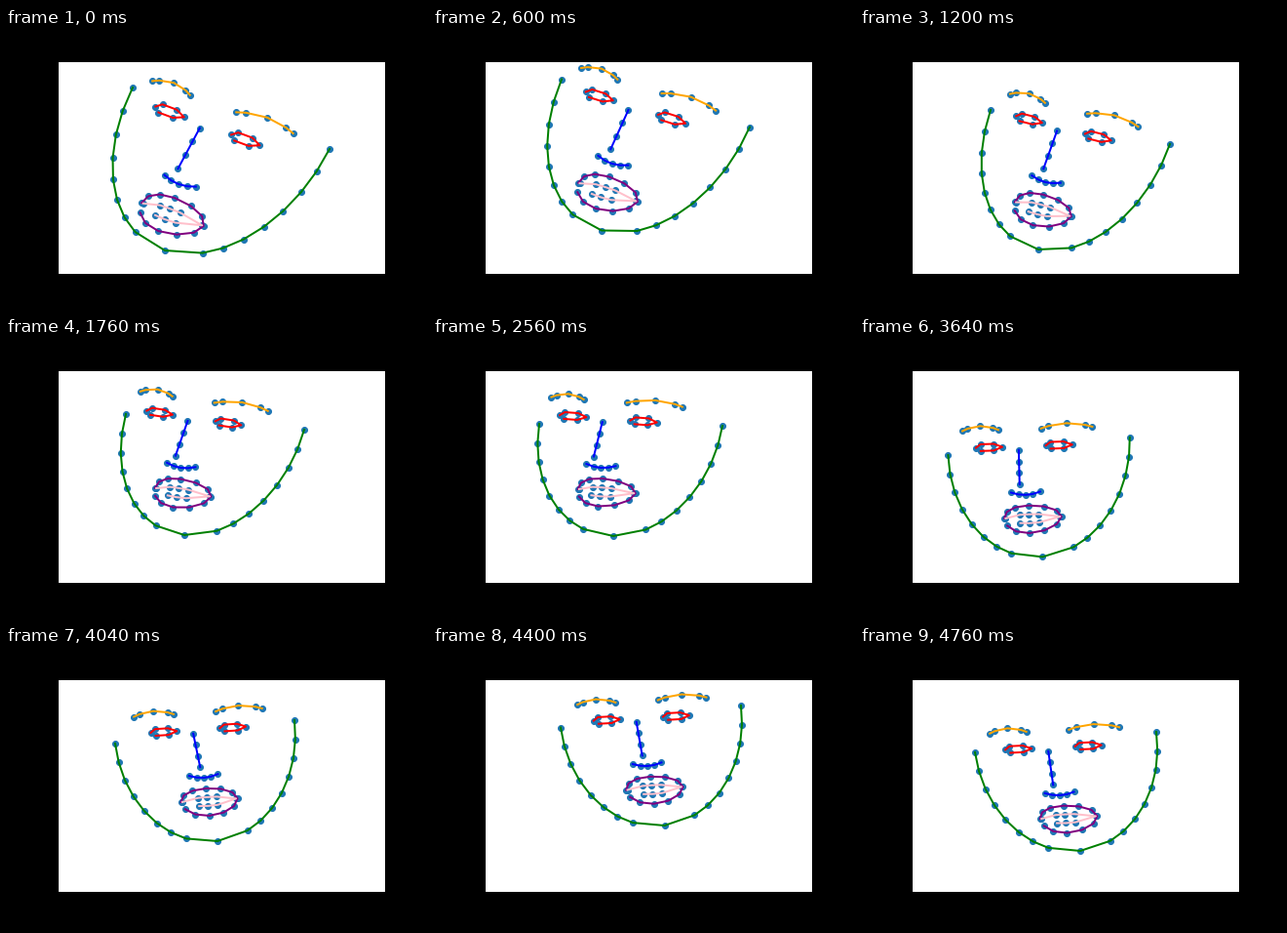
These frames come from a looping animation (432 px wide and 288 px high, 4.8 s). A matplotlib script:

```python
import numpy as np
import matplotlib.pyplot as plt
from matplotlib.animation import FuncAnimation
from matplotlib.patches import Rectangle

WIDTH, HEIGHT, DPI = 432, 288, 72
STEP, FRAMES = 40, 120

COLORS = ["green", "orange", "orange", "blue", "blue", "red", "red",
          "purple", "pink"]

# Head poses: time, left and right jaw ends, chin, nose tip,
# and the sway on the way to the next pose
POSES = [
    (0, (130, 61), (332, 124), (163, 228), (177, 160), (0, -20)),
    (1200, (134, 84), (318, 119), (183, 227), (190, 158), (0, 3)),
    (1760, (123, 79), (306, 95), (183, 203), (179, 134), (0, -6)),
    (2560, (109, 89), (297, 91), (185, 204), (172, 134), (1, -4)),
    (3200, (96, 115), (285, 103), (184, 224), (163, 162), (-14, 14)),
    (4040, (112, 100), (296, 76), (217, 200), (203, 135), (16, -21)),
    (4760, (118, 109), (304, 88), (226, 210), (205, 153), (0, 0)),
]
times = [p[0] for p in POSES]
anchors = np.array([p[1:5] for p in POSES], float)
sways = np.array([p[5] for p in POSES], float)

# Outline angles in degrees; the jaw leaves a wide gap around the chin
JAW = np.radians([*range(0, 80, 10), 90, *range(110, 190, 10)])
EYE = np.radians([180, 120, 60, 0, -60, -120])
LIPS = np.radians(np.arange(180, -180, -30))
MOUTH = np.radians([180, 110, 90, 70, 0, -70, -90, -110])
BROW = np.sin(np.linspace(-np.pi / 2, np.pi / 2, 5))
NOSTRILS = np.linspace(-1, 1, 5)


def plane(center, across, down, a, b):
    """Points a along the across axis and b along the down axis."""
    return center + np.outer(a, across) + np.outer(b, down)


def ring(center, across, down, angles, width, height, skew=0, droop=0):
    sin2 = np.sin(angles) ** 2
    return plane(center, across, down,
                 width * (np.cos(angles) + skew * sin2),
                 droop * sin2 - height * np.sin(angles))


def anchors_at(t):
    k = min(np.searchsorted(times, t, "right") - 1, len(times) - 2)
    u = (t - times[k]) / (times[k + 1] - times[k])
    blend = anchors[k] * (1 - u) + anchors[k + 1] * u
    return blend + sways[k] * np.sin(np.pi * u)


def face_at(t):
    left, right, chin, nose = anchors_at(t)
    middle, side = (left + right) / 2, (right - left) / 2
    down = chin - middle
    turn = (nose - middle - down / 2) @ side / (side @ side)
    across = side + (0, 6)  # the features lean a little more than the jaw

    jaw = plane(middle, side, down, -np.cos(JAW), np.sin(JAW))

    brows, eyes = [], []
    for sign in (-1, 1):
        eye = nose - 0.44 * down + sign * 0.385 * across
        eyes.append(ring(eye, across, down, EYE, 0.145, 0.035, skew=-0.2))
        brow = eye - 0.155 * down + sign * 0.09 * across
        span = 0.24 - sign * 0.27 * turn
        brows.append(plane(brow, across, down,
                           span * BROW, 0.04 * (BROW ** 2 - 1)))

    top = nose - 0.41 * down - 0.06 * side
    ridge = nose - 0.1 * down + 0.4 * turn * side
    bridge = np.linspace(top, ridge, 4)
    nostrils = plane(nose, across, down,
                     0.16 * NOSTRILS, -0.025 * NOSTRILS ** 2)

    center = nose + 0.21 * down - 0.45 * turn * side
    lips = ring(center, across, down, LIPS, 0.315, 0.125, 0.9 * turn, 0.015)
    mouth = ring(center, across, down, MOUTH, 0.3, 0.04, 0.9 * turn, 0.01)
    return [jaw, *brows, bridge, nostrils, *eyes, lips, mouth]


fig = plt.figure(figsize=(WIDTH / DPI, HEIGHT / DPI), dpi=DPI,
                 facecolor="black")
ax = fig.add_axes([0, 0, 1, 1])
ax.set_xlim(0, WIDTH)
ax.set_ylim(HEIGHT, 0)
ax.axis("off")
ax.add_patch(Rectangle((54, 35), 335, 217, color="white", lw=0, zorder=0))

dots = ax.scatter([], [], color="#1f77b4", zorder=1)
lines = [ax.plot([], [], color=c, lw=2, zorder=2)[0] for c in COLORS]


def draw(i):
    parts = face_at(i * STEP)
    dots.set_offsets(np.concatenate(parts))
    for line, part in zip(lines, parts):
        line.set_data(part[:, 0], part[:, 1])
    return [dots, *lines]


anim = FuncAnimation(fig, draw, frames=FRAMES, interval=STEP,
                     repeat=True, repeat_delay=0)
plt.show()
```
